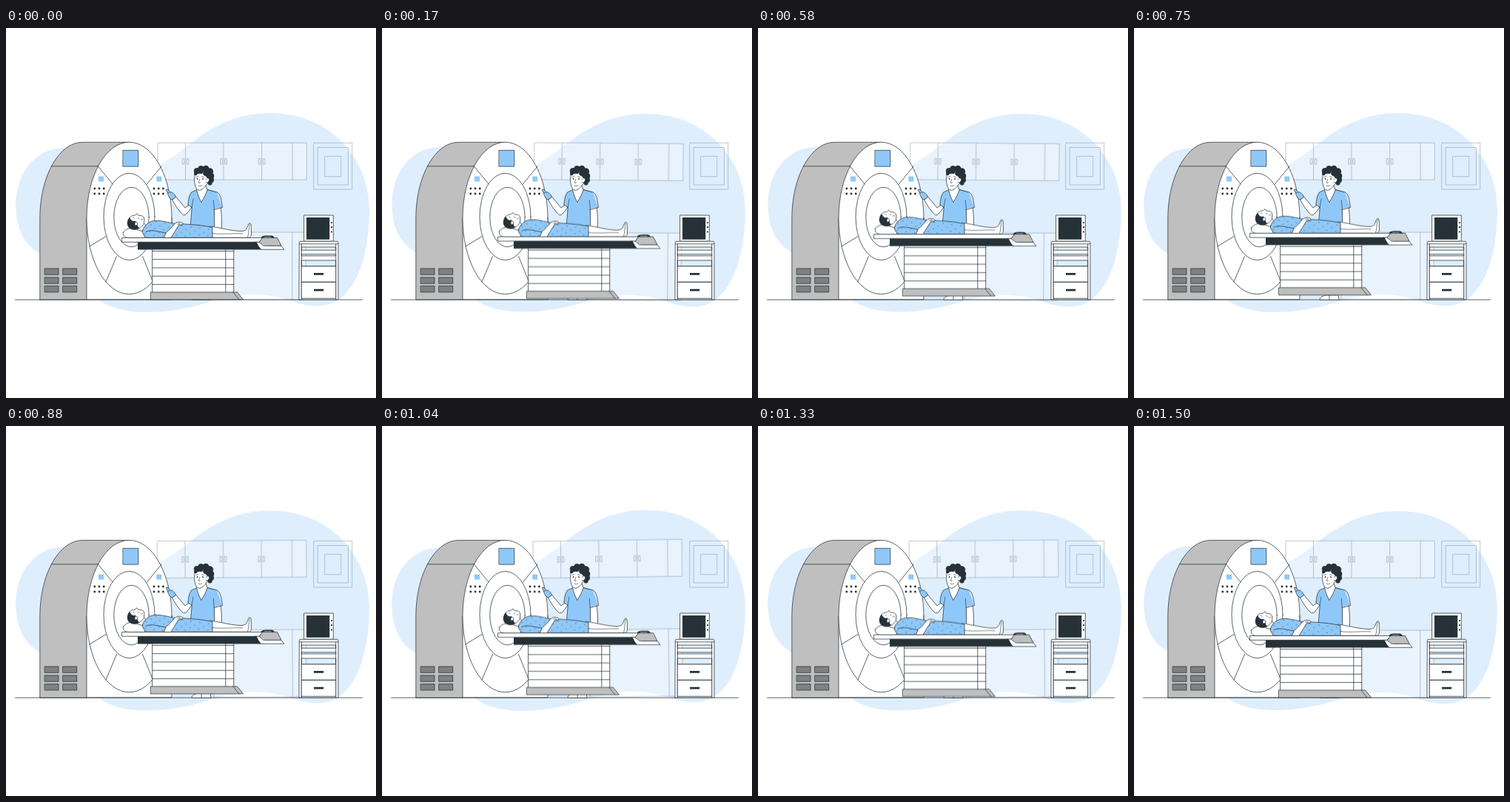
An HTML page that plays this animation: 500x500 px, repeating every 1540 ms.

```html
<!DOCTYPE html>
<html lang="en">
<head>
<meta charset="utf-8">
<title>Scanner room</title>
<style>
  html, body { margin: 0; width: 100%; height: 100%; overflow: hidden; background: #fff; }
  svg { display: block; width: 100%; height: 100%; }
  .ink { stroke: #263238; stroke-width: .75; stroke-linejoin: round; stroke-linecap: round; fill: none; }
  .pale { stroke: #8fa0ae; stroke-width: .6; fill: none; }
  .w { fill: #fff; }
  .g { fill: #bfbfbf; }
  .v { fill: #808080; }
  .b { fill: #8fc8f8; }
  .d { fill: #263238; }
  .sheer { fill: rgba(255, 255, 255, .3); }
  .thin { stroke-width: .6; }
  #back { transform-origin: 250px 250px; animation: sway 1540ms linear infinite; }
  #bed { animation: lift 1540ms linear infinite; }
  @keyframes sway {
    0%, 97.4%, 100% { transform: rotate(0deg); }
    24.35% { transform: rotate(1deg); }
    73.05% { transform: rotate(-1deg); }
  }
  @keyframes lift {
    0%, 97.4%, 100% { transform: translateY(0); }
    48.7% { transform: translateY(-6.2px); }
  }
</style>
</head>
<body>
<svg viewBox="0 0 500 500">
  <defs>
    <g id="handles"><path class="pale" d="M-4.3 -3.7h2.6v7.4h-2.6zM1.7 -3.7h2.6v7.4h-2.6z"/></g>
    <g id="vents">
      <path id="vent" class="ink v" d="M52.5 325h18.5v8.3H52.5zM77 325h18.7v8.3H77z"/>
      <use href="#vent" y="12"/><use href="#vent" y="23.7"/>
    </g>
    <g id="dots" class="d">
      <circle r="1.4"/><circle cx="6.2" r="1.4"/><circle cx="12.4" r="1.4"/>
      <circle cy="7" r="1.4"/><circle cx="6.2" cy="7" r="1.4"/><circle cx="12.4" cy="7" r="1.4"/>
    </g>
    <pattern id="print" width="12" height="9" patternUnits="userSpaceOnUse" patternTransform="rotate(8)">
      <rect width="12" height="9" fill="#8fc8f8"/>
      <circle cx="3" cy="2" r=".6" fill="#263238"/><circle cx="9" cy="6.5" r=".6" fill="#263238"/>
    </pattern>
  </defs>

  <g id="back">
    <path fill="#deeefd" d="M13.3 240C13 198 38 162 80 162C125 162 165 202 205 186
      C243 170 277 115 357 115C438 115 491 176 491 246C491 306 473 375.5 421 375.5
      C389 375.5 378 360 335 360C286 360 257 384 190 384C128 384 114 357 84 330
      C66 314 54 309 43 303C24 292 13.5 269 13.3 240Z"/>
    <path class="pale sheer" d="M205 155.2H406.3V205.2H205z"/>
    <path class="pale" d="M242.5 155.2v50M294 155.2v50M345.6 155.2v50M387 155.2v50"/>
    <use href="#handles" x="242.5" y="180.3"/>
    <use href="#handles" x="294" y="180.3"/>
    <use href="#handles" x="345.6" y="180.3"/>
    <path class="pale sheer" d="M280 276H405V367H280z"/>
    <path class="pale" d="M386.7 276V367"/>
  </g>

  <path class="pale" d="M415.7 155.3h52v62.7h-52zM421.2 161.5h41.3v50.5h-41.3zM430.7 173.3h22v27.4h-22z"/>

  <g id="scanner">
    <path class="ink g" d="M45.8 367V257A57.5 102.7 0 0 1 103.3 154.4H166.5V257L109 367z"/>
    <path class="ink w" d="M109 257V367H224V257z"/>
    <path class="ink" d="M61.5 186.8H125"/>
    <use href="#vents"/>
    <ellipse class="ink w" cx="166.5" cy="257" rx="57.5" ry="102.7"/>
    <path class="ink" d="M124.5 187L144.5 211.5M210 187L190 211.5M113 295L135 281.5M135 343L149.5 308.5M198.5 343L184.5 308.5"/>
    <ellipse class="ink w" cx="166.5" cy="255" rx="34.5" ry="58.7"/>
    <ellipse class="ink w" cx="169.5" cy="255.5" rx="23.7" ry="40.3"/>
    <path class="ink b" d="M158.3 165.3h20.5v21.8h-20.5z"/>
    <path class="b" d="M125 200.5h7v7h-7zM203.3 200.5h7v7h-7z"/>
    <use href="#dots" x="119.8" y="217"/>
    <use href="#dots" x="200" y="217"/>
  </g>

  <path class="ink" d="M12.5 367.2H481.5"/>

  <g id="nurse">
    <path class="ink w" d="M251 367C251 363 256 362 260 361H276L277 367z"/>
    <path class="ink" d="M264 361V367"/>
    <path class="ink w" d="M249.5 237L242 243L229.5 228L224.5 232C230 242 235 249 239.5 252.5C243 254 247 248 251.5 241z"/>
    <path class="ink b" d="M224.5 232C220 230 219 226 218.5 223L216.3 218.4C217.4 217 218.6 217.7 219.6 219.2L222 221.8C225 221.5 228 225 229.5 228z"/>
    <path class="ink thin" d="M219 223L221.6 222"/>
    <path class="ink b" d="M257.5 219L250.5 222C247 227 246.5 233 245.8 239L251.2 242C250.5 255 248.5 266 249 285H284L281.5 246L284 222L272 218.5z"/>
    <path class="ink w" d="M281.3 243L282 285H291C291.8 268 291.8 252 290 241z"/>
    <path class="b" d="M272 219L280 245L292 242L285 222z"/>
    <path class="ink" d="M272 218.5L285.5 222C290 225 291 232 292.5 242.5L281.3 245.5"/>
    <path class="ink thin" d="M251.2 242L253 231M281.3 245.5L280.3 233"/>
    <path class="ink w" d="M257.6 219C259 225 261.5 231 263.8 235.5C267.5 230 270.5 224 272 218.5L269.5 211H260z"/>
    <path class="ink w" d="M255.2 198C254 205 254.5 212 257.5 217.2C260 221 266 219 269.5 213.5L273.5 208L274 198L268 191z"/>
    <g class="d">
      <circle cx="258" cy="193.3" r="4.2"/><circle cx="263.5" cy="190.3" r="4.2"/>
      <circle cx="270" cy="190.5" r="4.7"/><circle cx="275.5" cy="194" r="4.7"/>
      <circle cx="277.3" cy="200" r="4"/><circle cx="277" cy="205.3" r="4"/>
      <circle cx="275.6" cy="209.4" r="3"/><circle cx="270.5" cy="196" r="4.4"/>
      <circle cx="256.2" cy="197" r="2.3"/><circle cx="263" cy="193.5" r="3.6"/>
      <circle cx="273.5" cy="200" r="3"/>
    </g>
    <path class="ink w" d="M270.5 204.5C271.5 201.5 275 202.3 274.5 205.5C274 208.5 271.5 209.5 270 208.5"/>
    <circle class="d" cx="258.6" cy="204" r=".9"/><circle class="d" cx="266" cy="204" r=".9"/>
    <path class="ink thin" d="M256.8 201.3L259.5 200.7M264.4 200.8L267.7 201.5M261.7 204.5L260.4 209.3H262.3M260 213.2Q262.5 214.6 265 212.8"/>
  </g>

  <g id="bed">
    <path class="ink w" d="M198 298H307.8V358H198z"/>
    <path class="ink" d="M198 301.5H307.8M198 312.7H307.8M198 324H307.8M198 335.3H307.8M198 346.6H307.8M296.8 299V357"/>
    <path class="ink g" d="M195.7 357H312.5L320.5 367H195.7z"/>
    <path class="ink" d="M306.8 357L315 367"/>

    <path class="ink w" d="M158.5 276C163 270 171 269 180 271.5C187 273 190 279 187 283.5H165C160 283 157.5 280 158.5 276z"/>
    <path class="ink w" d="M276 268C291 270 305 274.5 318 274.5C322 274.5 325 273 326 269.5L328 264.5C329.5 263.2 331.2 264 331.2 266L331.5 279C331 283 329 283.3 326 283.3H276z"/>
    <path class="ink thin" d="M278 277.5C294 279.5 307 277 320 278M326.5 283C328.5 277 327.5 272 329.3 265"/>
    <path class="ink w" d="M179 266L186.5 264L190 268L185.5 275L177 272.5z"/>
    <path class="ink w" d="M165.5 259C166.5 255.5 169.5 253.2 174 253.2L177 250.8L179 253.3L182.5 253.6C185.5 254 187 256 186.8 259L186.5 264C184.5 268 181 271 175 272C169 271 164.5 266 165.5 259z"/>
    <path class="d" d="M167.3 256C164.5 258.5 163.2 262 164 266C165.5 271 170 273.5 176 272.6L180.5 270.5C178.5 269.5 177.6 267.5 177.8 265.5L174.5 260.5C172 262 169 260.5 167.3 256z"/>
    <path class="ink w" d="M174 264.5C173.5 262 177 261.2 177.8 263.5C178.5 266 176.5 267.5 174.8 266.8"/>
    <path class="ink thin" d="M171.5 256L173.3 257.2M178.3 256.4L180 257.5M182.2 259L184.6 258.6"/>
    <path class="ink" style="fill:url(#print)" d="M184.5 274C186 267.5 193 261 201 260.5C211 259.8 219 263 229 264.5C246 265 264 266 279 269.5V283.3H191C187 282 184 278 184.5 274z"/>
    <path class="ink" d="M189 275.5C194 272.5 201 274 208 275.5L216 277"/>
    <path class="ink w" d="M213.5 283.2L216.5 276C220 274 224 269.5 227 265.5C230 262 235 261 239 264C239.2 266 236.5 266.8 233 267C230.5 271 226.5 278 223 283.2z"/>
    <path class="ink thin" d="M233.2 263.5L238 266M231.5 264.8L236 266.5"/>

    <path class="ink w" d="M157 283.5H347L342 289.3H157z"/>
    <path class="ink w" d="M337 289.3H343L351 294H371.5L376 299.3H345z"/>
    <path class="ink g" d="M342.3 289.3L346.8 283.5H366.5L372 294.3H348.5z"/>
    <path class="d" d="M178 289.3H338.5C341 292.5 341 297 345.5 299.5H178z"/>
    <path class="d" d="M344 283.8C345.5 281 348 280.4 351 280.4H358.5C361 280.4 362.3 282 363 283.8H360L358 282.6H349.5L347.5 283.8z"/>
  </g>

  <g id="cart">
    <path class="ink w" d="M403 253h39.3v35.2H403z"/>
    <path class="d" d="M406 256h31.3v29.8H406z"/>
    <circle class="d" cx="440" cy="263" r="1.1"/><circle class="d" cx="440" cy="269.2" r="1.1"/><circle class="d" cx="440" cy="275.5" r="1.1"/>
    <path class="ink w" fill-rule="evenodd" d="M396.3 290Q396.3 288.3 398 288.3H447.3Q449 288.3 449 290V367H396.3z
      M399.5 296h46.2v4.2h-46.2zM399.5 305.7h46.2v2.2h-46.2zM399.5 314h46.2v8h-46.2z"/>
    <path class="ink" d="M396.3 291.8H449M399.5 291.8V367M445.7 291.8V367"/>
    <path class="ink w" d="M399.5 322h46.2v21.3h-46.2zM399.5 343.3h46.2v22h-46.2z"/>
    <path class="d" d="M416 331h13.2v2.8H416zM416 352.8h13.2v2.8H416z"/>
  </g>
</svg>
</body>
</html>
```
